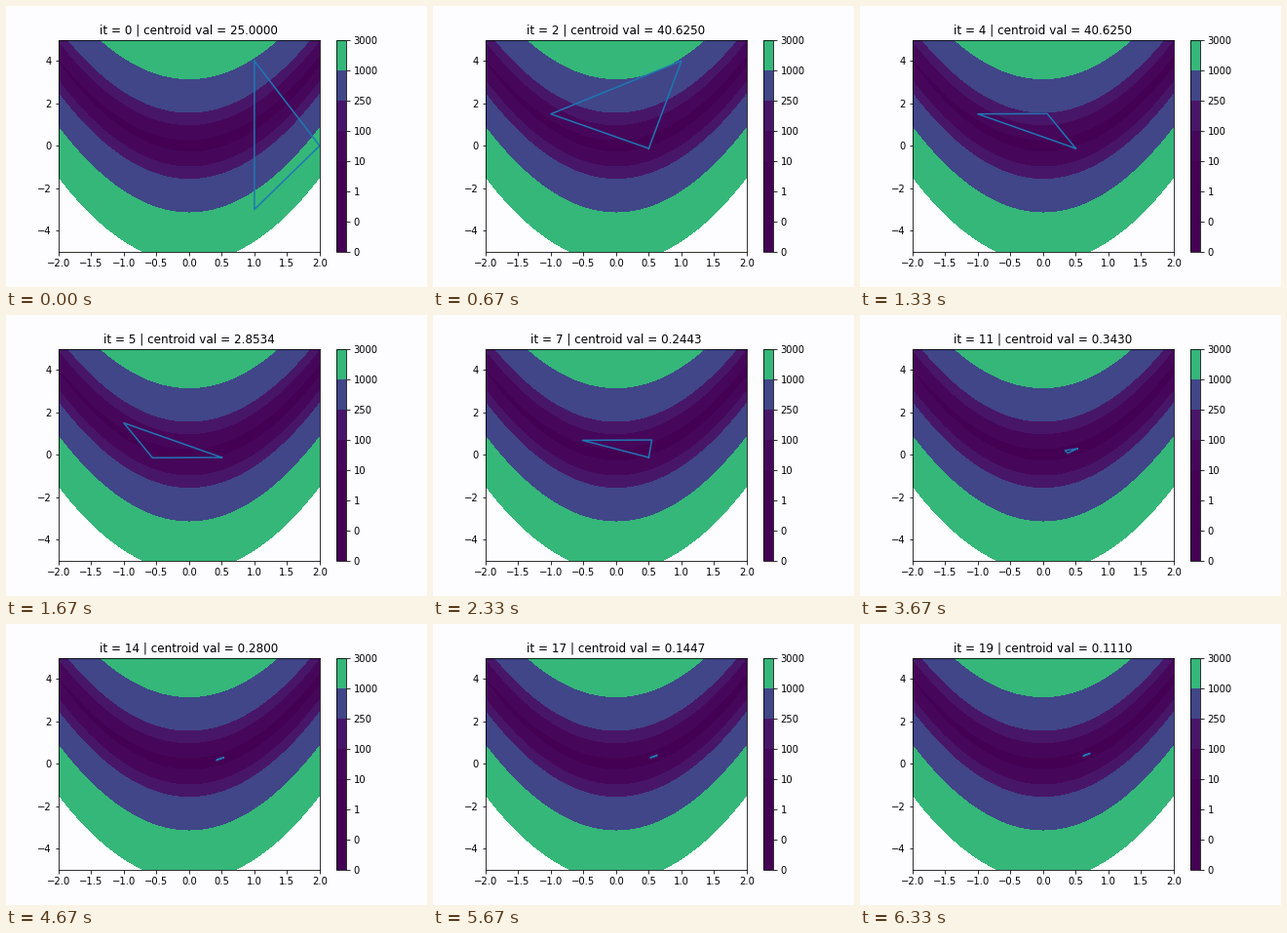
Animation of 432 by 288 pixels, one loop 6660 ms. Source, as a matplotlib script:

```python
import numpy as np
import matplotlib.pyplot as plt
from matplotlib.animation import FuncAnimation

STEPS = 20
LOOP = 6660          # ms
TICK = 30            # ms per drawn frame
STEP_TIME = 1000 / 3  # ms each simplex is shown
LEVELS = [0, 0.1, 1, 10, 100, 250, 1000, 3000]
START = [(1, 4), (1, -3), (2, 0)]
PAPER = "#fdfcfe"

plt.rcParams.update({
    "font.family": "DejaVu Sans",
    "font.size": 10,
    "figure.subplot.bottom": 0.125,
    "figure.facecolor": PAPER,
    "axes.facecolor": PAPER,
})


def rosenbrock(x, y):
    return (1 - x) ** 2 + 100 * (y - x ** 2) ** 2


def cost(p):
    return rosenbrock(p[0], p[1])


def ordered(points):
    return sorted((np.asarray(p, float) for p in points), key=cost)


def nelder_mead_step(simplex):
    """One update of a simplex sorted from best to worst."""
    best, second, worst = simplex
    center = (best + second) / 2
    reflected = 2 * center - worst
    if cost(reflected) < cost(best):
        expanded = center + 2 * (reflected - center)
        new = min(expanded, reflected, key=cost)
    elif cost(reflected) < cost(second):
        new = reflected
    else:
        new = (center + worst) / 2
        if cost(new) >= cost(worst):
            return ordered([best, (best + second) / 2, (best + worst) / 2])
    return ordered([best, second, new])


history = [ordered(START)]
while len(history) < STEPS:
    history.append(nelder_mead_step(history[-1]))

fig, ax = plt.subplots(figsize=(6, 4), dpi=72)
X, Y = np.meshgrid(np.linspace(-2, 2, 250), np.linspace(-5, 5, 250))
bands = ax.contourf(X, Y, rosenbrock(X, Y), LEVELS, cmap="viridis")
fig.colorbar(bands, ax=ax, format="%.0f")
outline, = ax.plot([], [], color="C0", lw=1.5)
ax.set_xlim(-2, 2)
ax.set_ylim(-5, 5)
title = ax.set_title("")


def update(tick):
    # A step begins with the tick that contains its start time.
    step = int(((tick + 1) * TICK - 1) / STEP_TIME)
    simplex = history[step]
    outline.set_data(*np.array(simplex + simplex[:1]).T)
    center = (simplex[0] + simplex[1]) / 2
    title.set_text(f"it = {step} | centroid val = {cost(center):.4f}")
    return outline, title


anim = FuncAnimation(fig, update, frames=LOOP // TICK, interval=TICK,
                     repeat=True, repeat_delay=0, blit=False)
plt.show()
```
